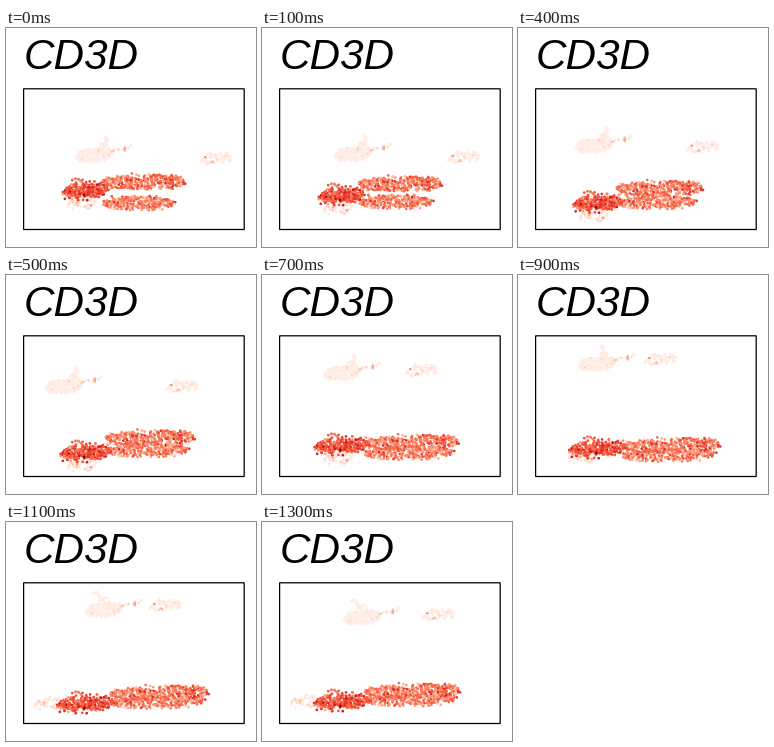
A matplotlib script that plays this animation: 250x219 px, repeating every 1.5 s.

```python
import numpy as np
import matplotlib.pyplot as plt
from matplotlib.animation import FuncAnimation
from matplotlib.patches import Rectangle

W, H, DPI = 250, 219, 100
PX = 72 / DPI
# View shown in each 100 ms step; halves lie between two views
STEPS = [0, 0.5, 1, 1, 1.5, 2, 2, 3, 3, 4, 4.5, 5, 5, 6, 6]

# The two coordinates that wander instead of following the swing
MONO_X = [88, 94, 58, 80, 79, 98, 100]
LEFT_Y = [163, 173, 178, 171, 174, 182, 180]

rng = np.random.default_rng(7)
reds = plt.get_cmap("Reds")


class Cluster:
    """Cells scattered over a straight strip with round ends."""

    def __init__(self, n, mean, spread, hot=0.0, rough=0.8):
        self.u = (np.arange(n) + rng.random(n)) / n
        width = np.sqrt(1 - np.abs(2 * self.u - 1) ** 3)
        self.v = rng.uniform(-1, 1, n) * width
        self.jitter = rng.normal(0, rough, (n, 2))
        level = rng.normal(mean, spread, n)
        lit = rng.random(n) < hot
        level[lit] = rng.uniform(0.2, 0.45, lit.sum())
        self.colors = reds(np.clip(level, 0.03, 0.97))

    def place(self, start, end, half):
        start, along = np.array(start), np.subtract(end, start)
        across = np.array([-along[1], along[0]]) / np.hypot(*along)
        return (start + np.outer(self.u, along)
                + np.outer(self.v * half, across) + self.jitter)


mono = Cluster(210, 0.045, 0.01, hot=0.03)
neck = Cluster(30, 0.05, 0.015, hot=0.08)
tail = Cluster(13, 0.14, 0.1)
side = Cluster(70, 0.06, 0.02, hot=0.13)
pale = Cluster(50, 0.09, 0.05, hot=0.08, rough=1.5)
lower = Cluster(290, 0.43, 0.13, rough=1.3)
upper = Cluster(370, 0.45, 0.13, rough=1.3)
left = Cluster(290, 0.57, 0.14, rough=2)
strays = Cluster(8, 0.48, 0.1)
clusters = [mono, neck, tail, side, pale, lower, upper, left, strays]


def scene(p):
    """Positions of all cells in view p, from 0 to 6."""
    swing = np.sin(np.pi * p / 9.2) ** 2
    turn = np.clip((p - 3.5) / 1.5, 0, 1)
    gap = 3.5 + 7 * 0.6 ** p

    views = range(len(MONO_X))
    mx, my = np.interp(p, views, MONO_X), 127 - 40 * swing
    sx, sy = 142 + 17 * abs(p - 4), 131 - 48 * swing
    lx, ly = 80, np.interp(p, views, LEFT_Y)
    px, py = lx - 3 - 33 * turn, ly + 12 - 13 * turn
    ax0, ay0 = 98 + 8 * swing, 165 + 12 * swing
    ax1, ay1 = 177 + 24 * swing, 164 + 10 * swing
    reach = 20 + 6 * swing

    return np.vstack([
        mono.place((mx - 17, my + 2), (mx + 17, my - 2), 7),
        neck.place((mx + 13 - 23 * turn, my - 18), (mx + 8, my - 3), 3.5),
        tail.place((mx + 14, my - 4), (mx + 40, my - 8), 2.5),
        side.place((sx - 15, sy + 2), (sx + 15, sy - 2), 6),
        pale.place((px - 14, py + 1), (px + 14, py - 1), 4.5),
        lower.place((ax0, ay0 + gap), (ax1 - gap, ay1 + gap), 6),
        upper.place((ax0, ay0 - gap), (ax1, ay1 - gap), 7),
        left.place((lx - reach, ly + 1), (lx + reach, ly - 2), 7),
        strays.place((lx - 12, ly - 10), (lx - 4, ly - 11), 2.5),
    ])


fig = plt.figure(figsize=(W / DPI, H / DPI), dpi=DPI, facecolor="white")
ax = fig.add_axes([0, 0, 1, 1])
ax.set_xlim(0, W)
ax.set_ylim(H, 0)
ax.axis("off")

ax.text(18, 41, "CD3D", family="Liberation Sans", style="italic",
        size=42.3 * PX, va="baseline", ha="left")
ax.add_patch(Rectangle((17.6, 60.8), 220.6, 140.7, fill=False,
                       ec="black", lw=1.25 * PX, snap=False))
dots = ax.scatter(*scene(0).T, s=3.7, linewidths=0,
                  c=np.vstack([c.colors for c in clusters]))


def draw(i):
    dots.set_offsets(scene(STEPS[i]))
    return [dots]


anim = FuncAnimation(fig, draw, frames=len(STEPS), interval=100,
                     repeat=True, repeat_delay=0)
plt.show()
```
